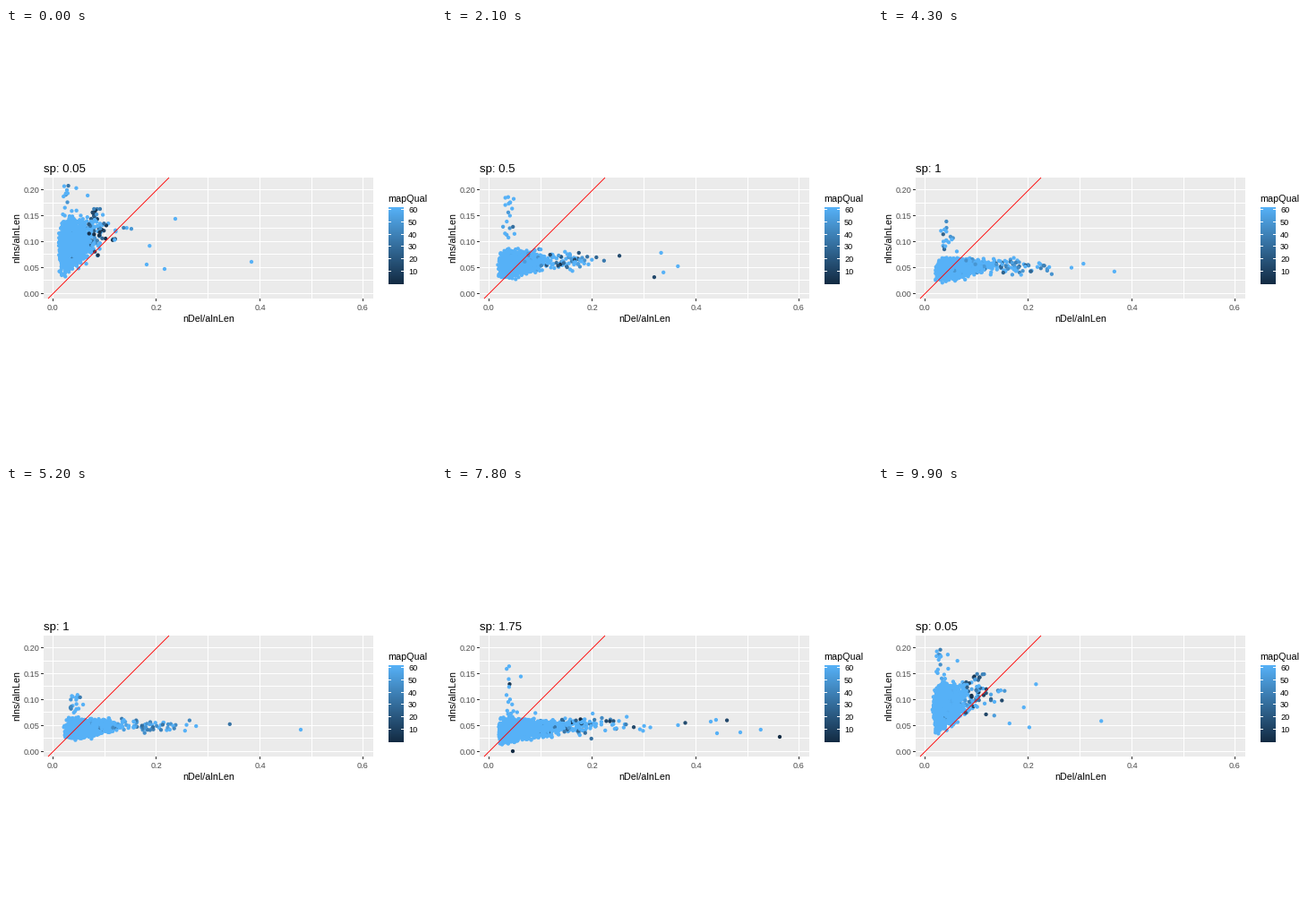
A matplotlib script for the animation above (10000 ms loop, 480x480 px).

```python
import numpy as np
import matplotlib.pyplot as plt
from matplotlib.animation import FuncAnimation
from matplotlib.colors import LinearSegmentedColormap
from matplotlib.patches import Rectangle

plt.rcParams["font.family"] = "Liberation Sans"

SIZE, DPI = 480, 72
FRAMES, INTERVAL = 100, 100
SP = [0.05, 0.25, 0.5, 0.75, 1, 1.25, 1.5, 1.75, 2]
HOLD = 4                                        # frames at rest, last arrival included
STEPS = [9, 9, 8, 8, 8, 8, 8, 8, 8]             # frames per transition
LEFT, RIGHT, TOP, BOTTOM = 42, 410, 167, 302    # panel, pixels
X0, Y0, UNIT = 52.3, 296.1, 577.5               # origin and pixels per unit
N, TAIL, COLUMN = 2000, 50, 18                  # all points, right tail, upper spray
GREY, INK = "#4D4D4D", "#333333"
QUAL = LinearSegmentedColormap.from_list("qual", ["#132B43", "#56B1F7"])

# Shape of the scatter at four key states, interpolated between them
KEY_STATES = [0, 2, 5, 7]
SHAPE = {
    "left": [57, 61, 63, 63],
    "shape": [4, 2, 2, 2],
    "scale": [4.2, 11, 13, 14],
    "centre": [242, 266, 271, 272],
    "half": [39, 23, 19, 18],
    "slope": [-0.4, -0.12, -0.08, -0.06],
    "tail_x": [92, 132, 140, 148],
    "tail_scale": [14, 24, 28, 34],
    "tail_y": [228, 264, 268, 268],
    "tail_sd": [13, 6, 6, 7],
    "tail_dark": [0.65, 0.3, 0.3, 0.35],
    "spray": [36, 62, 28, 58],
}

# Far outliers: states they belong to, x, y, quality
FAR = [
    ([0], 274, 261, 60), ([0], 189, 213, 60), ([0], 177, 269, 60),
    ([0], 157, 264, 60), ([1], 290, 268, 60), ([2], 318, 270, 60),
    ([2], 297, 277, 60), ([2], 279, 286, 1), ([3], 393, 280, 1),
    ([3], 325, 272, 60), ([3], 300, 275, 60), ([3], 255, 252, 60),
    ([4, 5], 329, 272, 60), ([6], 331, 273, 1), ([7], 377, 280, 1),
    ([7], 333, 275, 60), ([7], 300, 263, 60), ([7], 307, 276, 60),
    ([7], 79, 296, 1), ([8], 334, 275, 60),
]

rng = np.random.default_rng(7)


def quality(dark):
    """Full quality, or a random low one where dark is set."""
    return np.where(dark, rng.uniform(1, 50, len(dark)), 60)


def scatter_state(s):
    p = {name: np.interp(s, KEY_STATES, v) for name, v in SHAPE.items()}
    mean = p["shape"] * p["scale"]
    u = rng.gamma(p["shape"], p["scale"], N)
    v = 2 * rng.beta(4, 4, N) - 1
    x = p["left"] + u
    y = p["centre"] + p["slope"] * (u - mean) + p["half"] * np.exp(-u / 170) * v
    q = quality(rng.random(N) < 0.005 * (u / mean) ** 3)

    tail = slice(N - TAIL, N)
    x[tail] = p["tail_x"] + rng.exponential(p["tail_scale"], TAIL)
    y[tail] = p["tail_y"] + p["tail_sd"] * rng.normal(size=TAIL).clip(-2, 2)
    q[tail] = quality(rng.random(TAIL) < p["tail_dark"])

    spray = slice(N - TAIL - COLUMN, N - TAIL)
    top = p["centre"] - 0.8 * p["half"]
    x[spray] = p["left"] + 6 + rng.gamma(2, 4, COLUMN)
    y[spray] = top - p["spray"] * rng.random(COLUMN) ** 1.3
    q[spray] = quality(rng.random(COLUMN) < 0.1)
    return np.column_stack([x, y, q])


states = np.array([scatter_state(s) for s in range(len(SP))])
for row, (where, *point) in enumerate(FAR):
    states[where, row] = point

fig = plt.figure(figsize=(SIZE / DPI, SIZE / DPI), dpi=DPI, facecolor="white")
ax = fig.add_axes([0, 0, 1, 1])
ax.axis("off")


def box(x, y, w, h, color, z=1):
    ax.add_patch(Rectangle((x, y), w, h, fc=color, lw=0, zorder=z))


def label(x, y, text, size, color="black", **kw):
    return ax.text(x, y, text, fontsize=size, color=color, va="baseline", **kw)


box(LEFT, TOP, RIGHT - LEFT, BOTTOM - TOP, "#EBEBEB", 0)

for i in range(7):
    x = int(X0 + UNIT * i / 10)
    box(x, TOP, 1, BOTTOM - TOP, "white")
    if i % 2 == 0:
        box(x, BOTTOM, 1, 3, INK)
        label(x + 0.5, 315.2, f"{i / 10:.1f}", 9.1, GREY, ha="center")

for i in range(9):
    y = int(Y0 - UNIT * i / 40)
    box(LEFT, y, RIGHT - LEFT, 1, "white")
    if i % 2 == 0:
        box(LEFT - 3, y, 3, 1, INK)
        label(37, y + 3.8, f"{i / 40:.2f}", 9.1, GREY, ha="right")

label(226, 328.5, "nDel/alnLen", 10.7, ha="center")
label(15.5, 234, "nIns/alnLen", 10.7, ha="center", rotation=90,
      rotation_mode="anchor")
title = label(42, 161, "", 13.2)

# Colour bar
label(426.5, 194, "mapQual", 10.7)
ax.imshow(np.linspace(1, 0, 256)[:, None], cmap=QUAL, aspect="auto",
          extent=(427, 444, 286, 200), zorder=1)
for v in range(10, 61, 10):
    y = int(202.2 + 1.39 * (60 - v))
    box(427, y, 3, 1, "white", 2)
    box(441, y, 3, 1, "white", 2)
    label(449, y + 4, str(v), 9.1)

dots = ax.scatter(*states[0, :, :2].T, c=states[0, :, 2], cmap=QUAL,
                  vmin=1, vmax=60, s=4.3 ** 2, linewidths=0, zorder=3)
ax.plot([LEFT + 5, LEFT + 5 + BOTTOM - TOP], [BOTTOM, TOP], color="red",
        lw=0.9, solid_capstyle="butt", zorder=4)
ax.set_xlim(0, SIZE)
ax.set_ylim(SIZE, 0)


def pose(frame):
    """State index and linear progress towards the next state."""
    start = 0
    for i, steps in enumerate(STEPS):
        rest = HOLD - 1
        k = frame - start - rest + 1
        if k < steps:
            return i, max(k, 0) / steps
        start += rest + steps
    return 0, 0


def draw(frame):
    i, t = pose(frame)
    j = (i + 1) % len(SP)
    now = (1 - t) * states[i] + t * states[j]
    dots.set_offsets(now[:, :2])
    dots.set_array(now[:, 2])
    title.set_text(f"sp: {SP[j if t > 0.5 else i]:g}")
    return dots, title


anim = FuncAnimation(fig, draw, frames=FRAMES, interval=INTERVAL, repeat=True,
                     repeat_delay=0)
plt.show()
```
